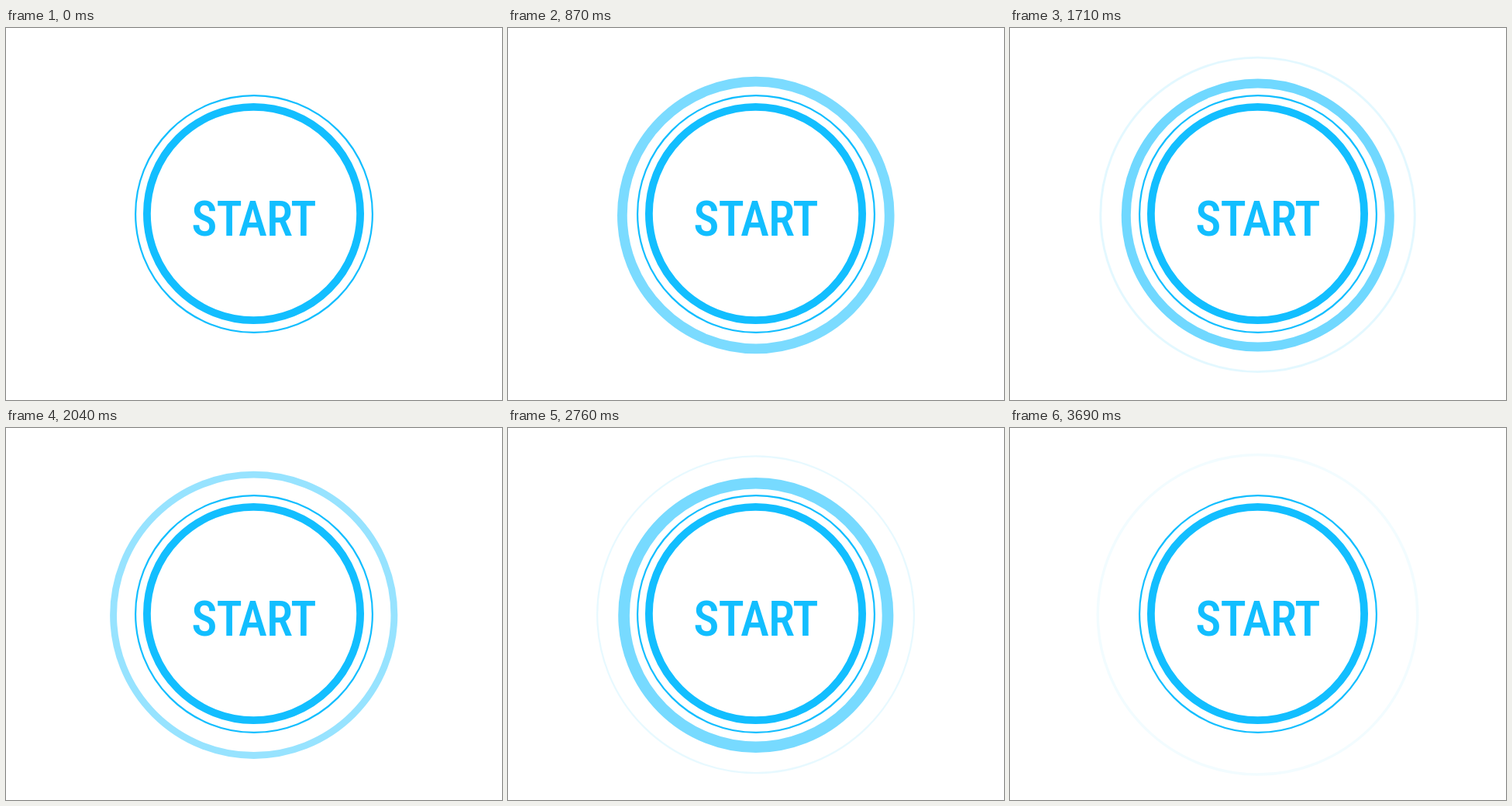
An HTML page for the animation above (4320 ms loop, 640 by 480 pixels).

```html
<!DOCTYPE html>
<html lang="en">
<head>
<meta charset="utf-8">
<title>Start button</title>
<style>
  html, body { margin: 0; width: 100%; height: 100%; overflow: hidden; background: #fff; }
  svg { display: block; width: 100vw; height: 100vh; }
  text {
    font: 500 62.5px "Roboto Condensed", Roboto, sans-serif;
    font-stretch: 75%;
    letter-spacing: -1px;
    text-anchor: middle;
    fill: #12beff;
  }
</style>
</head>
<body>
<svg viewBox="0 0 640 480" fill="none" stroke="#12beff">
  <g id="ripples"></g>
  <circle cx="320" cy="240" r="152.9" fill="#fff" stroke-width="2.2"/>
  <circle cx="319.5" cy="239.5" r="137.6" stroke-width="9.8"/>
  <text x="319.5" y="268" stroke="none">START</text>
</svg>
<script>
  const LOOP = 4320, STEP = 30, LAST = 3690;
  const R0 = 152.4, FADE = 0.017;

  // Outer radius: r + speed * age + drag * age²; width shrinks as the ring grows.
  const ripples = [
    { start: 0,    r: 152.4,  speed: 0.0303,  drag: 0,         width: 22.9, thin: 0.385 },
    { start: 930,  r: 152.26, speed: 0.03146, drag: -1.3e-6,   width: 19.9, thin: 0.333 },
    { start: 2100, r: 152.59, speed: 0.04,    drag: -3.245e-6, width: 24,   thin: 0.37 }
  ];

  const layer = document.getElementById("ripples");
  for (const ripple of ripples) {
    ripple.el = document.createElementNS("http://www.w3.org/2000/svg", "circle");
    layer.append(ripple.el);
  }

  function set(el, attrs) {
    for (const name in attrs) el.setAttribute(name, attrs[name]);
  }

  function drawRipple(ripple, t) {
    const age = t - ripple.start;
    const r = ripple.r + age * (ripple.speed + ripple.drag * age);
    const p = (r - R0) * FADE;
    const visible = age > 0 && p < 1;
    ripple.el.style.display = visible ? "" : "none";
    if (!visible) return;
    const w = Math.max(1, ripple.width - ripple.thin * (r - R0));
    set(ripple.el, {
      cx: 320 - 0.5 * p,
      cy: 242.1 - 1.4 * p,
      r: r - w / 2,
      "stroke-width": w,
      opacity: Math.min(1, 1 - p)
    });
  }

  function draw(ms) {
    const t = Math.min(LAST, Math.floor((ms % LOOP) / STEP) * STEP);
    for (const ripple of ripples) drawRipple(ripple, t);
  }

  const began = performance.now();
  function tick() {
    draw(performance.now() - began);
    requestAnimationFrame(tick);
  }
  tick();
</script>
</body>
</html>
```
